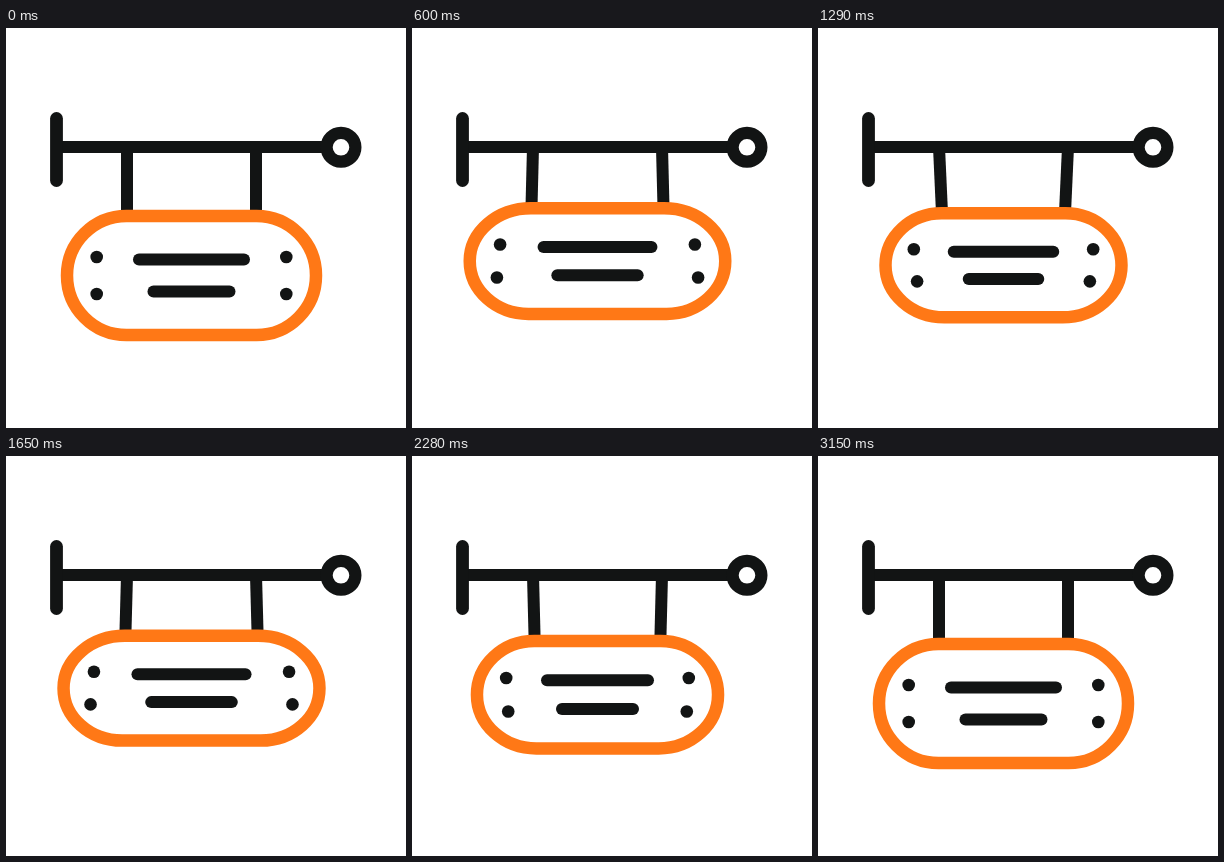
Animation, 400 px wide and 400 px high, one loop 3180 ms. Source, as an HTML page with a canvas:

```html
<!DOCTYPE html>
<html lang="en">
<head>
<meta charset="utf-8">
<title>Swinging sign</title>
<style>
html, body { margin: 0; width: 100%; height: 100%; overflow: hidden; background: #fff; }
canvas { display: block; width: 400px; height: 400px; }
</style>
</head>
<body>
<canvas id="stage" width="400" height="400"></canvas>
<script>
const ctx = document.getElementById('stage').getContext('2d');
const INK = '#121414', ORANGE = '#ff7816';
const LOOP = 3180, STEP = 30, CX = 185.5, PIVOT = 119, K = 0.5523;

const REST = {
  top: 188, bottom: 307, half: 124.5, post: 64.5,
  dotX1: 94.8, dotY1: 229, dotX2: 94.8, dotY2: 266,
  line1Y: 231.6, line1: 52.5, line2Y: 263.6, line2: 38
};

// Offsets from rest at full swing, in the key order of REST.
const TOWARD = [-16, -44, 6.8, 3.2, 5.4, -26, 12.1, -34.5, -26.3, 3, -34.3, 4.5];
const AWAY = [-4.6, -29.4, -10.8, -5, -8.5, -13, -14, -21, -13, -4.6, -21, -5.4];
const AWAY_SMALL = [-3.3, -15.8, -4.3, -1.8, -3.8, -7.6, -6, -11.4, -8, -2.2, -11.4, -2.7];

const SWINGS = [
  { from: 0, peak: 375, to: 705, pose: TOWARD, amp: 1, softStart: true },
  { from: 705, peak: 1075, to: 1440, pose: AWAY, amp: 1 },
  { from: 1440, peak: 1765, to: 2090, pose: TOWARD, amp: 0.6 },
  { from: 2090, peak: 2345, to: 2600, pose: AWAY_SMALL, amp: 1 },
  { from: 2600, peak: 2770, to: 3130, pose: TOWARD, amp: 0.3, softEnd: true }
];

const swingOut = u => Math.sin(u * Math.PI / 2);
const smooth = u => (1 - Math.cos(u * Math.PI)) / 2;

function poseAt(t) {
  const s = SWINGS.find(w => t >= w.from && t < w.to);
  if (!s) return REST;
  const rising = t < s.peak;
  const u = rising ? (t - s.from) / (s.peak - s.from) : (s.to - t) / (s.to - s.peak);
  const ease = (rising ? s.softStart : s.softEnd) ? smooth : swingOut;
  const k = ease(u) * s.amp;
  const pose = {};
  Object.keys(REST).forEach((key, i) => { pose[key] = REST[key] + s.pose[i] * k; });
  return pose;
}

function line(x1, y1, x2, y2, width = 12, cap = 'round') {
  ctx.lineWidth = width;
  ctx.lineCap = cap;
  ctx.beginPath();
  ctx.moveTo(x1, y1);
  ctx.lineTo(x2, y2);
  ctx.stroke();
}

function circle(x, y, r) {
  ctx.beginPath();
  ctx.arc(x, y, r, 0, Math.PI * 2);
}

function board(p) {
  const mid = (p.top + p.bottom) / 2;
  const a = p.post + 0.5;
  const b = 65 + (p.dotX2 - REST.dotX2) * 0.7;
  const h = (p.bottom - p.top) / 2 * K;
  const ha = a + (p.half - a) * K, hb = b + (p.half - b) * K;
  ctx.beginPath();
  ctx.moveTo(CX - a, p.top);
  ctx.lineTo(CX + a, p.top);
  ctx.bezierCurveTo(CX + ha, p.top, CX + p.half, mid - h, CX + p.half, mid);
  ctx.bezierCurveTo(CX + p.half, mid + h, CX + hb, p.bottom, CX + b, p.bottom);
  ctx.lineTo(CX - b, p.bottom);
  ctx.bezierCurveTo(CX - hb, p.bottom, CX - p.half, mid + h, CX - p.half, mid);
  ctx.bezierCurveTo(CX - p.half, mid - h, CX - ha, p.top, CX - a, p.top);
  ctx.closePath();
  ctx.strokeStyle = ORANGE;
  ctx.lineWidth = 12.5;
  ctx.stroke();
}

function draw(t) {
  const p = poseAt(t);
  ctx.fillStyle = '#fff';
  ctx.fillRect(0, 0, 400, 400);
  ctx.strokeStyle = ctx.fillStyle = INK;

  for (const side of [-1, 1]) {
    line(CX + side * REST.post, PIVOT, CX + side * p.post, p.top, 12, 'butt');
    for (const n of [1, 2]) {
      circle(CX + side * p['dotX' + n], p['dotY' + n], 6.3);
      ctx.fill();
    }
  }
  line(CX - p.line1, p.line1Y, CX + p.line1, p.line1Y);
  line(CX - p.line2, p.line2Y, CX + p.line2, p.line2Y);

  line(50.5, PIVOT, 320, PIVOT, 12, 'butt');
  line(50.5, 90.5, 50.5, 152.5, 12.8);
  ctx.lineWidth = 12.2;
  circle(335, 119.3, 14.4);
  ctx.stroke();

  board(p);
}

const start = performance.now();
function tick() {
  const t = (performance.now() - start) % LOOP;
  draw(Math.floor(t / STEP) * STEP);
  requestAnimationFrame(tick);
}
tick();
</script>
</body>
</html>
```
